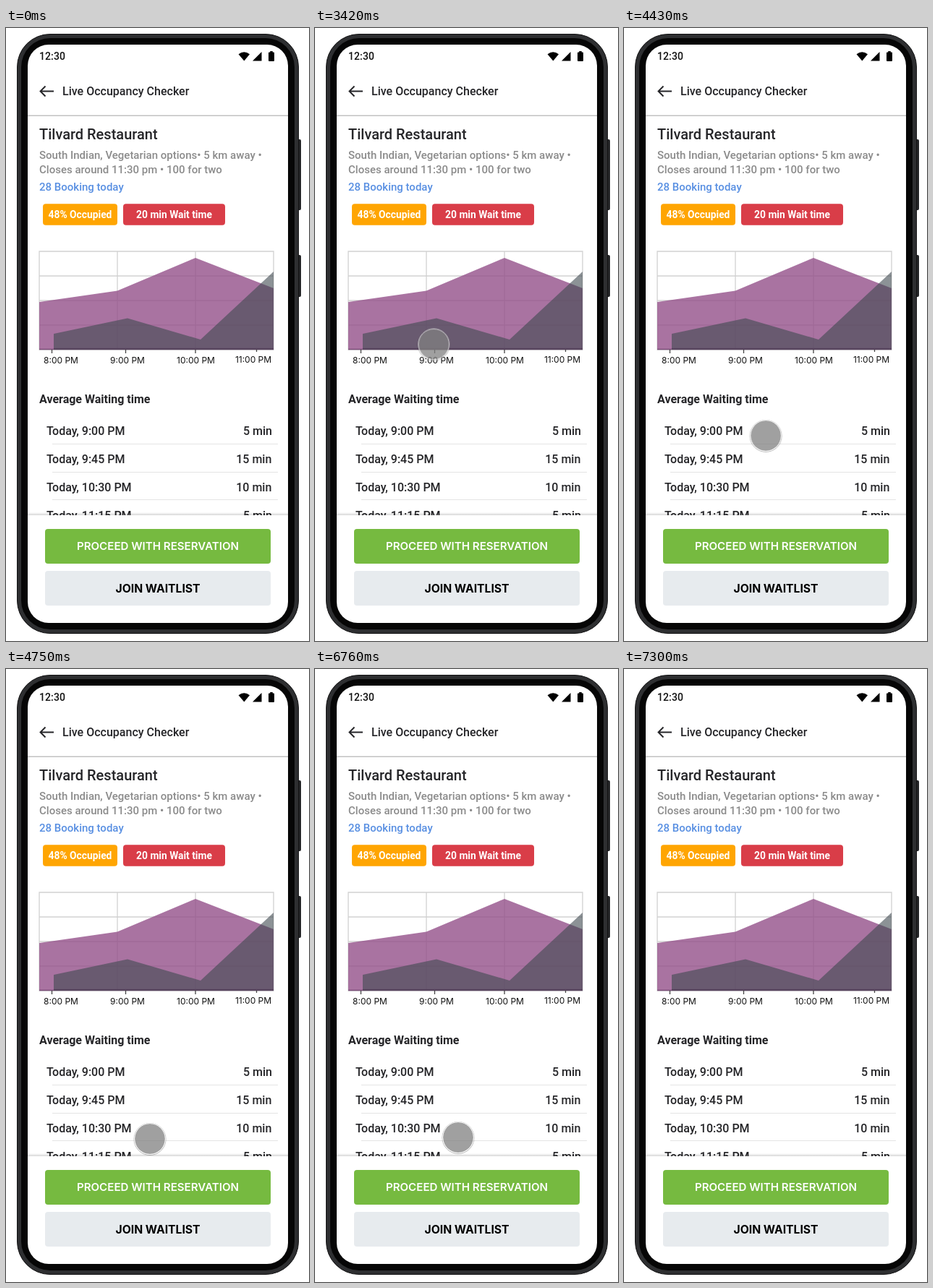
These frames come from a looping animation (419 px wide and 848 px high, 8720 ms). An HTML page:

```html
<!DOCTYPE html>
<html lang="en">
<head>
<meta charset="utf-8">
<title>Live Occupancy Checker</title>
<style>
html, body { margin: 0; width: 100%; height: 100%; overflow: hidden; background: #fff; }
svg { display: block; width: 419px; height: 848px; font: 500 16px Roboto, sans-serif; fill: #252528; }
.end { text-anchor: end; }
.name { font-size: 20px; }
.info { font-size: 15px; fill: #8b8b8b; }
.link { font-size: 15px; fill: #588fe2; }
.badge { font-size: 13.8px; font-weight: 600; fill: #fff; text-anchor: middle; }
.axis { font: 400 12px Inter, sans-serif; fill: #111; text-anchor: middle; }
.btn { font: 600 16px Inter, sans-serif; fill: #000; text-anchor: middle; }
.line { fill: none; stroke: #d2d2d2; stroke-width: 1.3; }
.rule { fill: none; stroke: #e4e4e4; }
.cursor { animation: move 8720ms linear infinite; }
@keyframes move {
  0% { transform: translate(-60px, 441px); animation-timing-function: step-end; }
  36.697% { transform: translate(-20px, 441px); animation-timing-function: cubic-bezier(.215, .61, .355, 1); }
  41.858%, 45.413% { transform: translate(192px, 437px); }
  45.413% { animation-timing-function: cubic-bezier(.33, .18, .5, 1); }
  54.472% { transform: translate(199px, 650px); animation-timing-function: step-end; }
  62.958% { transform: translate(198px, 649px); animation-timing-function: step-end; }
  77.522% { transform: translate(198px, 648px); animation-timing-function: cubic-bezier(.5, .03, .75, .75); }
  83.715%, 100% { transform: translate(-26px, 486px); }
}
</style>
</head>
<body>
<svg viewBox="0 0 419 848" xmlns="http://www.w3.org/2000/svg">
  <defs>
    <linearGradient id="fade" x2="0" y2="1">
      <stop offset="0" stop-color="#000" stop-opacity="0"/>
      <stop offset="1" stop-color="#000" stop-opacity=".16"/>
    </linearGradient>
  </defs>

  <!-- phone -->
  <rect x="402" y="154" width="6" height="98" rx="2" fill="#242527"/>
  <rect x="402" y="314" width="6" height="58" rx="2" fill="#242527"/>
  <rect x="15.5" y="8.5" width="389" height="829" rx="45.5" fill="#2e2f31" stroke="#121213"/>
  <rect x="21" y="14" width="378" height="818" rx="40" fill="#060606"/>
  <rect x="30" y="23" width="360" height="800" rx="29" fill="#fff"/>

  <!-- status bar -->
  <text x="46" y="44" font-size="14" letter-spacing=".1" fill="#111">12:30</text>
  <g fill="#000">
    <path d="M321.5 36.2Q329.3 30.2 337 36.2L329.3 45.5Z"/>
    <path d="M353.5 33V45.5H341Z"/>
    <path d="M365.3 33.4V32H368.7V33.4H370Q371 33.4 371 34.4V45Q371 46 370 46H364Q363 46 363 45V34.4Q363 33.4 364 33.4Z"/>
  </g>

  <!-- header -->
  <path d="M66 87.5H48M54.5 80.5L47.5 87.5L54.5 94.5" fill="none" stroke="#252528" stroke-width="1.9"/>
  <text x="78" y="92.5">Live Occupancy Checker</text>
  <path d="M30 121.3H390" stroke="#c2c2c2" stroke-width="1.6"/>

  <text class="name" x="46" y="153.5">Tilvard Restaurant</text>
  <text class="info" x="46" y="180.5">South Indian, Vegetarian options• 5 km away •</text>
  <text class="info" x="46" y="200.5">Closes around 11:30 pm • 100 for two</text>
  <text class="link" x="46" y="224.5">28 Booking today</text>

  <rect x="51" y="243.3" width="103" height="29.4" rx="4" fill="#ffa502"/>
  <text class="badge" x="102.5" y="262.5">48% Occupied</text>
  <rect x="162" y="243.3" width="141" height="29.4" rx="4" fill="#d93d48"/>
  <text class="badge" x="232.5" y="262.5">20 min Wait time</text>

  <!-- chart -->
  <path class="line" d="M46 309H370V445H46ZM46 343H370M46 377H370M46 411H370M154 309V445M262 309V445"/>
  <path d="M46 379L154 363.5L262 318L370 360V445H46Z" fill="#94508a" fill-opacity=".8"/>
  <path d="M66 423L168 401.5L269 431L370 337V445H66Z" fill="#404a50" fill-opacity=".6"/>
  <path d="M66 444H370" stroke="#54405a" stroke-opacity=".8" stroke-width="2.5"/>
  <path d="M46 444.5H66" stroke="#7b4f78" stroke-width="1.5"/>
  <path d="M63.5 445V450M165.5 445V450M262 445V450M346.5 445V448" stroke="#444" stroke-width="1.3"/>
  <text class="axis" x="76" y="464">8:00 PM</text>
  <text class="axis" x="168" y="464">9:00 PM</text>
  <text class="axis" x="262.5" y="464">10:00 PM</text>
  <text class="axis" x="342" y="463">11:00 PM</text>

  <!-- waiting times -->
  <text x="46" y="519" font-weight="700">Average Waiting time</text>
  <text x="56" y="563">Today, 9:00 PM</text>
  <text class="end" x="368" y="563">5 min</text>
  <text x="56" y="602">Today, 9:45 PM</text>
  <text class="end" x="367.3" y="602">15 min</text>
  <text x="56" y="640.5">Today, 10:30 PM</text>
  <text class="end" x="367.3" y="640.5">10 min</text>
  <text x="56" y="679.5">Today, 11:15 PM</text>
  <text class="end" x="368" y="679.5">5 min</text>
  <path class="rule" d="M64 575.5H376M64 614.5H376M64 652.5H376"/>

  <!-- actions -->
  <rect x="30" y="670" width="360" height="4" fill="url(#fade)"/>
  <rect x="30" y="674" width="360" height="110" fill="#fff"/>
  <rect x="54" y="693" width="312" height="48" rx="4" fill="#76ba40"/>
  <text class="btn" x="210" y="722" style="font-size:15.1px;fill:#fff">PROCEED WITH RESERVATION</text>
  <rect x="54" y="751" width="312" height="48" rx="4" fill="#e7ebee"/>
  <text class="btn" x="210" y="781" style="font-size:15.7px;font-weight:700">JOIN WAITLIST</text>

  <g class="cursor">
    <circle cy=".4" r="22" fill="none" stroke="#000" stroke-opacity=".3"/>
    <circle r="21" fill="#808080" fill-opacity=".75"/>
    <circle r="21.4" fill="none" stroke="#fff" stroke-opacity=".85"/>
  </g>
</svg>
</body>
</html>
```
